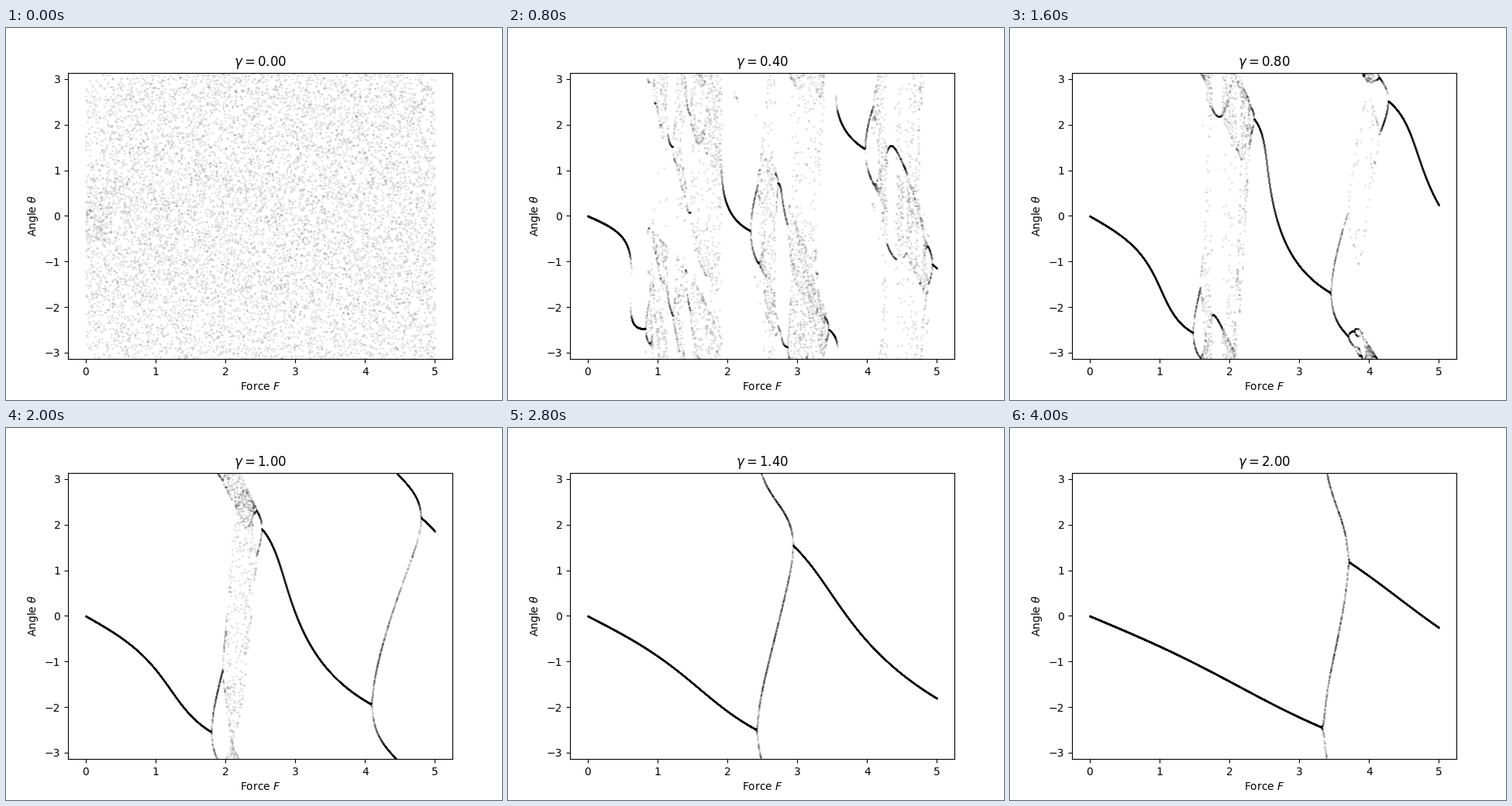
Write a matplotlib script that moves like this. It is 640x480 px and loops after 4.1 s.

```python
"""Stroboscopic angle of a driven, damped pendulum for growing damping."""
import numpy as np
import matplotlib.pyplot as plt
from matplotlib.animation import FuncAnimation

OMEGA = 0.66           # drive frequency
STEPS = 40             # integration steps per drive period
PERIODS = 60
N = 10000
FORCE = np.linspace(0, 5, N).astype(np.float32)
GAMMAS = np.linspace(0, 2, 41)

rng = np.random.default_rng(7)


def strobe(gamma):
    """Angles after many periods of x'' = -sin x - gamma x' + F sin(omega t).

    The angle is split into the exact response of the force-driven rotor
    plus a remainder, which is advanced by alternating drifts and kicks.
    Each pendulum starts at rest at a random angle.
    """
    h = 2 * np.pi / OMEGA / STEPS
    phase = 2 * np.pi * np.arange(1, STEPS + 1) / STEPS
    gain = 1 / (1j * OMEGA * (gamma + 1j * OMEGA))
    response = (np.exp(1j * phase) * gain).imag.tolist()
    decay = float(np.exp(-gamma * h))
    drift = float((1 - decay) / gamma) if gamma else h

    x = rng.uniform(-np.pi, np.pi, N).astype(np.float32)
    x -= FORCE * float(gain.imag)
    v = FORCE * float(OMEGA / (gamma**2 + OMEGA**2))

    angle = np.empty_like(x)
    for _ in range(PERIODS):
        for r in response:
            x += v * drift
            v *= decay
            np.multiply(FORCE, r, out=angle)
            angle += x
            np.sin(angle, out=angle)
            angle *= h
            v -= angle
    theta = x + FORCE * response[-1]
    return (theta + np.pi) % (2 * np.pi) - np.pi


sections = [strobe(float(g)) for g in GAMMAS]

fig, ax = plt.subplots(figsize=(6.4, 4.8), dpi=100)
dots, = ax.plot(FORCE, sections[0], "k.", markersize=0.2)
ax.set_xlim(-0.25, 5.25)
ax.set_ylim(-np.pi, np.pi)
ax.set_xlabel("Force $F$")
ax.set_ylabel(r"Angle $\theta$")
title = ax.set_title("")


def update(i):
    dots.set_ydata(sections[i])
    title.set_text(rf"$\gamma = {GAMMAS[i]:.2f}$")
    return dots, title


anim = FuncAnimation(fig, update, frames=len(GAMMAS), interval=100,
                     repeat=True, repeat_delay=0, blit=False)
plt.show()
```
